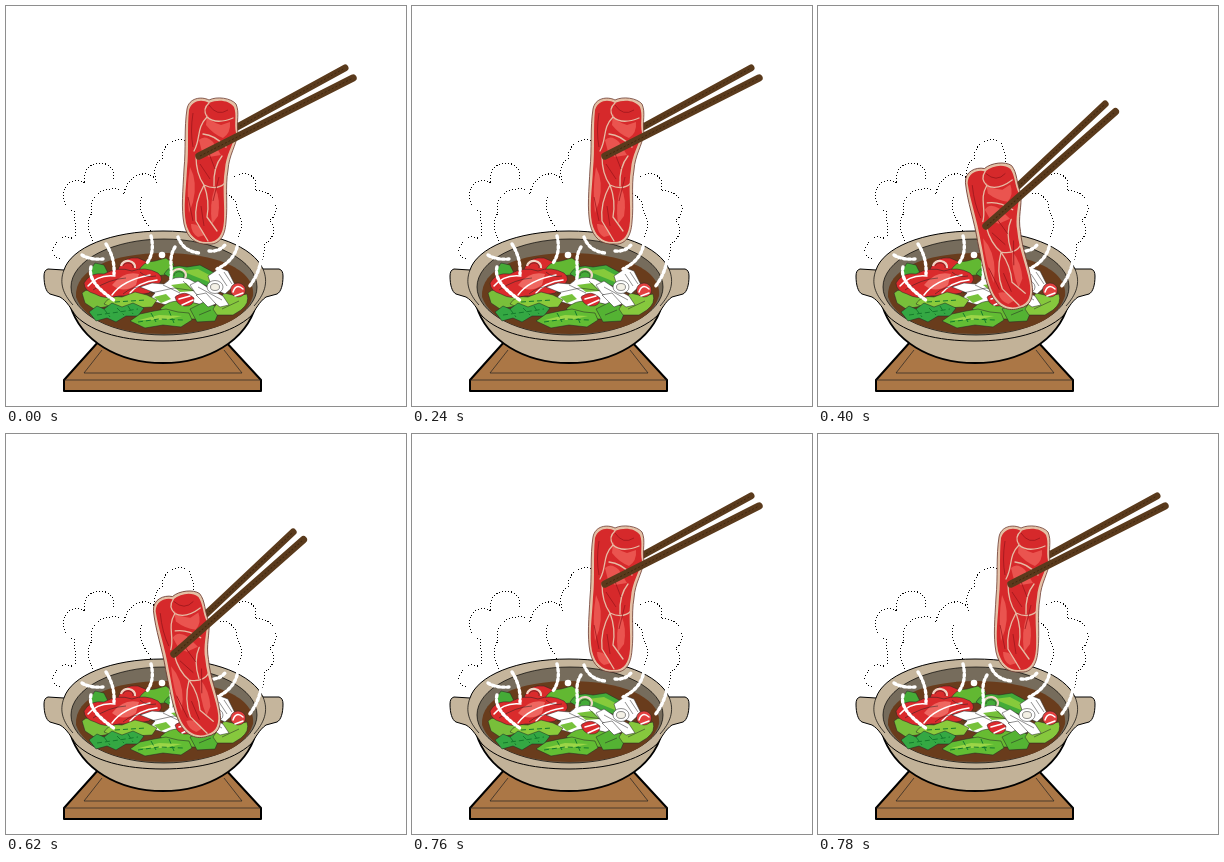
Write an HTML page that moves like this. It is 400 by 400 pixels and loops after 800 ms.

```html
<!DOCTYPE html>
<html lang="en">
<head>
<meta charset="utf-8">
<title>Hot pot</title>
<style>
html, body { margin: 0; width: 100%; height: 100%; overflow: hidden; background: #fff; }
svg { display: block; width: 100vw; height: 100vh; }
.line { fill: none; stroke: #222; stroke-width: .7; }
.thin { stroke: #222; stroke-width: .5; }
.steam { fill: none; stroke: #000; stroke-width: 1; stroke-dasharray: 1 2; shape-rendering: crispEdges; }
.wisp { fill: none; stroke: #fff; stroke-width: 3.4; stroke-linecap: round; stroke-dasharray: 2.4 2.6; }
.fat { fill: none; stroke: #e6bba4; stroke-width: 1.3; stroke-linecap: round; }
.white { fill: none; stroke: #fff; stroke-width: 1.5; stroke-linecap: round; }
.vein { fill: none; stroke: #157a2c; stroke-width: 1; stroke-dasharray: 5 3; }
.stick { stroke: #5a3a1c; stroke-width: 7.4; stroke-linecap: round; }
.back { stroke-width: 7; }
.grain { stroke: #40270f; stroke-width: 1; stroke-dasharray: 2 2; }
</style>
</head>
<body>
<svg viewBox="0 0 400 400" stroke-linejoin="round">
  <!-- stand -->
  <path fill="#ab7746" stroke="#000" stroke-width="2" d="M93 335 58 374V385H255V374L219 335Z"/>
  <path class="line" stroke="#5d4a36" d="M58 374H255M96 344 78 367H236L218 344"/>

  <!-- steam clouds -->
  <g class="steam">
    <path d="M54 253C44 250 45 240 51 238C50 230 62 229 67 233C73 227 67 216 69 206C58 203 54 190 60 181C64 173 74 173 79 177C76 163 85 157 95 157C105 158 110 166 107 175"/>
    <path d="M87 235C80 224 82 212 86 207C83 194 91 184 104 183C112 182 116 185 118 188C120 174 131 167 140 168C147 169 150 173 151 177"/>
    <path d="M151 177C146 166 150 155 156 153C156 140 166 133 176 134C185 135 188 145 187 157"/>
    <path d="M136 191C132 201 136 212 143 220C148 230 146 242 145 250M100 238 106 250"/>
    <path d="M228 171C235 165 248 167 250 177L249 185C261 183 271 193 270 204C269 211 265 213 264 215C270 222 268 234 258 238"/>
    <path d="M214 188C223 185 232 195 231 205C237 214 236 224 232 232M258 238C259 247 257 254 252 264"/>
  </g>

  <!-- pot -->
  <g stroke="#000" stroke-width="1">
    <path fill="#c2b298" stroke-width="1.8" d="M64 299C75 335 112 357 157 357C202 357 240 335 250 299Z"/>
    <path fill="#c5b59c" d="M157 225C209 225 247 241 257 263L273 263Q277 264 277 270C277 279 275 286 271 288L260 291C253 296 250 303 245 310C226 327 194 335 157 335C119 335 87 327 70 310C65 303 61 295 54 291L44 288C40 286 38 279 38 270Q38 264 42 263L58 264C65 242 104 225 157 225Z"/>
    <path fill="none" stroke-width=".7" d="M58 264C53 277 57 288 67 299M257 263C263 277 258 289 248 300"/>
    <ellipse cx="158" cy="281" rx="93" ry="48" fill="#766c5c" stroke-width=".7"/>
  </g>
  <path fill="#693c1c" d="M70 291C68 263 107 247 158 247C209 247 250 263 247 290C239 317 201 328 158 328C114 328 78 315 70 291Z"/>

  <!-- ingredients -->
  <g class="thin">
    <path fill="#45ab37" d="M83 266 89 257 98 259 103 269 91 275Z"/>
    <path fill="#da2b2c" d="M112 263Q117 250 132 252L144 257 139 268 120 269Z"/>
    <path fill="#62b832" d="M132 266Q137 255 149 255L160 252 168 258 164 268Q145 272 132 266Z"/>
    <path fill="#78bf3a" d="M76 287Q82 281 91 286L107 289 104 300 88 303 79 297Z"/>
    <path fill="#da2b2c" d="M78 277Q84 266 98 268Q112 260 126 265Q139 260 152 267Q160 274 150 280L143 287Q128 291 113 290Q99 294 89 288Q78 285 78 277Z"/>
    <path fill="#ee6660" stroke="none" d="M106 279Q118 264 133 268L130 279Q117 288 106 279Z"/>
    <path class="white" d="M82 280Q92 268 109 270M106 289Q117 274 144 269M124 287Q133 276 151 274"/>
    <path class="line thin" d="M87 284Q103 273 120 272M117 288Q126 280 141 280M134 266Q140 272 150 270"/>

    <path fill="#43ab38" d="M158 268Q164 257 181 261L194 259 207 266 222 272Q226 281 217 287L198 279 176 279Z"/>
    <path fill="#86ca3b" stroke="none" d="M176 265 192 263 209 272 203 276 188 270Z"/>
    <path fill="#fff" d="M134 281 146 277 158 278Q169 268 183 273L202 283Q204 294 194 299L177 294 160 299 143 294 149 287Z"/>
    <path fill="#77c23b" stroke="none" d="M165 279 180 277 188 285 174 286ZM148 291 160 288 165 293 155 297Z"/>
    <path class="line thin" d="M145 287 168 282 190 285M157 279 174 287M177 275 195 292"/>

    <path fill="#8bcb3b" d="M98 298Q103 289 116 291L129 286 141 289 151 294 146 301 128 302 108 302Z"/>
    <path fill="#67bc32" d="M154 303Q163 293 180 295L197 299 193 313 171 313Z"/>
    <path fill="#dc2b2e" d="M169 291Q179 283 188 292Q188 301 178 300Q171 299 169 291Z"/>
    <path class="white" d="M173 293 184 290M176 299 187 294"/>
    <path fill="#54b333" d="M184 303 200 295 214 303 209 315 191 316Z"/>
    <path fill="#86c83d" d="M207 303 218 287 231 290 241 288Q244 297 235 304L227 309 211 309Z"/>
    <path class="line thin" d="M216 303 233 295M193 309 205 304"/>

    <path fill="#fff" d="M184 279 192 275 204 283 217 290 223 299 214 301 203 293 190 288Z"/>
    <path fill="#fff" d="M202 270 214 262 222 265 229 279 219 288 206 282Z"/>
    <path fill="#fff" d="M190 289 200 287 210 298 202 301Z"/>
    <ellipse cx="209" cy="281" rx="8" ry="6.5" fill="#fff"/>
    <ellipse cx="209" cy="281" rx="4.5" ry="3.5" fill="#f4f1e6"/>
    <path class="line thin" d="M213 268 221 280M192 281 216 294M218 266 226 278"/>
    <ellipse cx="232" cy="284" rx="7.5" ry="7" fill="#e2403f"/>
    <path class="white" d="M227 286Q230 277 237 283M229 290 237 287"/>

    <path fill="#34a843" d="M83 306 91 300 98 303 106 297 116 301 127 297 138 302 132 310 120 310 110 316 101 312 90 315Z"/>
    <path class="vein" stroke="#b7e370" d="M91 309 113 306 132 303"/>
    <path class="vein" d="M98 303 104 311M111 302 118 309M122 300 127 308"/>
    <path fill="#62bd34" d="M124 315 134 308 148 305 160 303 172 306 183 307 186 314 175 321 157 319 139 322Z"/>
    <path fill="#9bd547" stroke="none" d="M133 314 153 309 176 310 158 314Z"/>
    <path class="vein" d="M132 316 153 313 177 314M145 307 150 316M163 305 168 317M109 296 140 294"/>
    <path fill="none" stroke="#f0d6c6" stroke-width="2.2" d="M115 260A7 6 0 1 1 129 262M166 270A7 6 0 1 1 179 272"/>
    <path class="line thin" d="M117 260A5 4 0 1 1 127 262M168 270A5 4 0 1 1 177 272"/>
  </g>

  <!-- rising wisps -->
  <g class="wisp">
    <path d="M76 249Q84 254 97 253M85 261C82 273 92 283 109 295"/>
    <path d="M100 238Q109 252 108 268M145 230Q149 246 141 257"/>
    <path d="M169 241C161 254 168 263 164 276M172 231Q177 245 193 247M203 245Q213 246 219 239"/>
    <path d="M232 236Q230 254 211 263M255 240Q258 261 243 281"/>
  </g>
  <circle cx="156" cy="249" r="3.3" fill="#fff"/>

  <!-- slice held by chopsticks -->
  <g id="catch">
    <path class="stick back" d="M222 126 339 62"/>
    <path class="grain" d="M234 120 339 62"/>
    <g id="meat">
      <path fill="#e4c1a6" stroke="#6b3a30" stroke-width=".8" d="M181 103C183 92 195 90 203 94C211 90 225 92 230 98C234 107 230 116 232 127C230 140 223 149 222 164C219 181 222 198 220 216C219 231 213 239 202 238C190 239 181 232 178 218C175 202 177 184 178 163C180 143 178 122 181 103Z"/>
      <path fill="#d6292b" d="M183 104C186 94 196 93 203 97C212 93 223 94 228 101C231 109 228 117 230 127C227 139 220 149 219 163C216 181 219 198 218 215C217 229 212 236 202 236C191 237 183 230 180 217C177 202 180 184 181 163C183 143 181 122 183 104Z"/>
      <g fill="#ea544f">
        <path d="M201 108Q204 116 215 119L224 116Q225 127 217 132Q207 128 200 119Z"/>
        <path d="M193 134Q199 128 207 136L215 149 203 151 196 146Z"/>
        <path d="M184 161Q192 176 187 196L183 207Q180 184 184 161Z"/>
        <path d="M209 181Q215 194 212 210L206 218Q203 198 209 181Z"/>
        <path d="M185 218Q194 217 199 229L192 231Q185 227 185 218Z"/>
      </g>
      <g class="fat">
        <path d="M203 97Q196 103 201 111Q210 119 227 112M201 111C190 122 195 133 188 145M197 128Q209 129 220 141"/>
        <path d="M190 150Q190 168 198 179Q211 185 219 177M198 179Q188 197 190 215L202 235M198 179Q204 195 201 211L211 225M216 150Q207 161 208 180"/>
      </g>
      <path fill="none" stroke="#9d171c" stroke-width=".8" d="M187 107Q184 126 187 141M203 99Q211 111 222 104M202 145 209 163M194 158 204 173M195 200 198 220M213 171 207 195M182 191 187 215"/>
    </g>
    <path class="stick" d="M193 150 347 72"/>
    <path class="grain" d="M194 150 347 72"/>
  </g>
</svg>
<script>
const LOOP = 800, DIP_START = 400, DIP_END = 760;
const grip = document.getElementById("catch");
const meat = document.getElementById("meat");
const start = performance.now();

function draw(t) {
  const dipped = t >= DIP_START && t < DIP_END;
  grip.setAttribute("transform", dipped ? "translate(-25 70) rotate(-14.6 193 150)" : "");
  meat.setAttribute("transform", dipped ? "translate(3 0)" : "");
}

function tick() {
  draw((performance.now() - start) % LOOP);
  requestAnimationFrame(tick);
}

tick();
</script>
</body>
</html>
```
